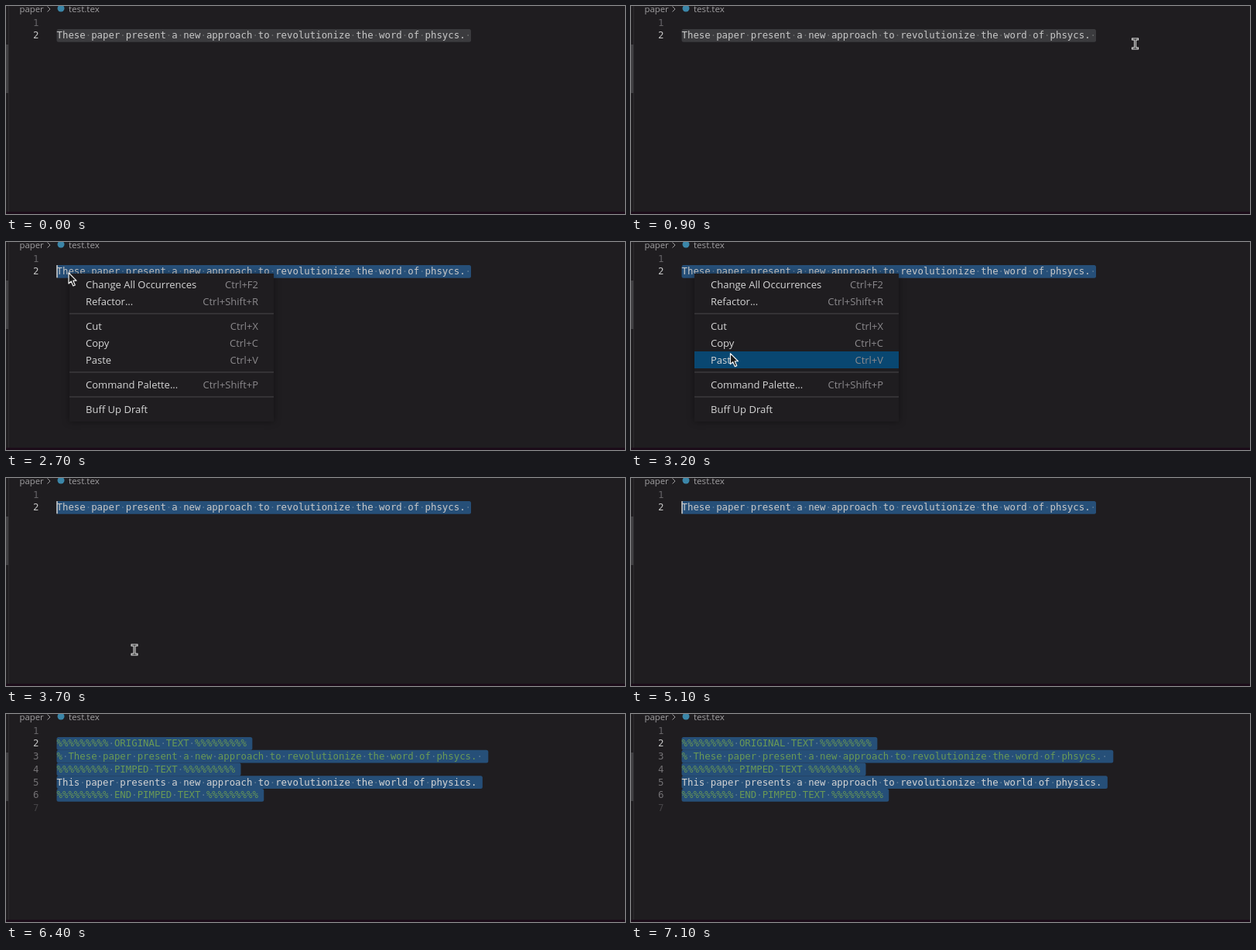
An HTML page with a canvas that plays this animation: 800x270 px, repeating every 7.2 s.

```html
<!DOCTYPE html>
<html lang="en">
<head>
<meta charset="utf-8">
<title>Editor rewrite</title>
<style>
html, body { margin: 0; width: 800px; height: 270px; overflow: hidden; background: #1f1d20; }
canvas { display: block; }
</style>
</head>
<body>
<canvas id="stage" width="800" height="270"></canvas>
<script>
const ctx = document.getElementById('stage').getContext('2d');
const LOOP = 7200, STEP = 100;
const LEFT = 65.5, TOP = 30, CHAR = 7.4375, LINE = 16.75;
const MONO = '12.35px "DejaVu Sans Mono", monospace';
const SANS = '"Open Sans", "Noto Sans", sans-serif';
const CLICK = 1200, DRAG_END = 2400, MENU = 2700, BLUR = 2900, CLOSE = 3700,
      HIDE = 4000, REPLACE = 5500, COLOUR = 6400;

const draft = 'These paper present a new approach to revolutionize the word of phsycs. ';
const bar = '%'.repeat(9);
const result = [
  `${bar} ORIGINAL TEXT ${bar}`,
  '% ' + draft,
  `${bar} PIMPED TEXT ${bar}`,
  'This paper presents a new approach to revolutionize the world of physics.',
  `${bar} END PIMPED TEXT ${bar}`
];

// label, shortcut, y
const items = [
  ['Change All Occurrences', 'Ctrl+F2', 55],
  ['Refactor...', 'Ctrl+Shift+R', 77],
  ['Cut', 'Ctrl+X', 109],
  ['Copy', 'Ctrl+C', 131],
  ['Paste', 'Ctrl+V', 153],
  ['Command Palette...', 'Ctrl+Shift+P', 185],
  ['Buff Up Draft', '', 217]
];

// time, x, y
const path = [
  [300, 686, 90], [800, 652, 49], [1300, 650, 49], [1400, 600, 56],
  [1800, 286, 61], [2000, 110, 54], [2100, 62, 42], [2300, 44, 40],
  [2500, 72, 39], [2600, 81, 40], [2800, 81, 40], [3500, 164, 223], [3700, 166, 223]
];

function mouseAt(t) {
  const i = path.findIndex(p => p[0] > t);
  if (i < 0) return path[path.length - 1].slice(1);
  if (i === 0) return path[0].slice(1);
  const [a, ax, ay] = path[i - 1], [b, bx, by] = path[i];
  const k = (t - a) / (b - a);
  return [ax + (bx - ax) * k, ay + (by - ay) * k];
}

function box(x, y, w, h, color) {
  ctx.fillStyle = color;
  ctx.fillRect(x, y, w, h);
}

function text(str, x, y, color, font, align = 'left') {
  ctx.font = font;
  ctx.textAlign = align;
  ctx.fillStyle = color;
  ctx.fillText(str, x, y);
}

const baseline = row => TOP + row * LINE + 12.4;

// Text on the fixed character grid; spaces from column `from` show as dots
function code(str, row, color, from) {
  [...str].forEach((c, i) => {
    const x = LEFT + i * CHAR;
    if (c !== ' ') text(c, x, baseline(row), color, MONO);
    else if (i >= from) text('·', x, baseline(row), 'rgba(227,228,226,.27)', MONO);
  });
}

function select(row, from, to, color) {
  ctx.fillStyle = color;
  ctx.beginPath();
  ctx.roundRect(LEFT + from * CHAR, TOP + row * LINE, (to - from) * CHAR, LINE, 2.5);
  ctx.fill();
}

function lineNumber(n, color) {
  text(n, 42.5, baseline(n - 2), color, MONO, 'right');
}

function frame() {
  box(0, 0, 800, 270, '#1f1d20');
  box(3, 0, 1, 267, '#2d2b2e');
  box(0, 50, 3, 63, '#414043');
  box(0, 267, 800, 3, '#1b0c19');
  text('paper', 17.5, 8, '#a09fa1', '11.3px ' + SANS);
  text('test.tex', 81, 8, '#a09fa1', '11.6px ' + SANS);
  ctx.strokeStyle = '#a09fa1';
  ctx.lineWidth = 1;
  ctx.stroke(new Path2D('M53.5 0.5l3.5 3.5l-3.5 3.5'));
  ctx.fillStyle = '#3b86a8';
  ctx.beginPath();
  ctx.arc(71, 3, 4.5, 0, 7);
  ctx.fill();
}

function editor(t, [mx, my]) {
  const done = t >= REPLACE;
  let start = 0;
  if (t >= CLICK && t < DRAG_END) {
    start = my > TOP + LINE ? draft.length
      : Math.max(0, Math.min(draft.length, Math.round((mx - LEFT) / CHAR)));
  }
  lineNumber(1, '#666467');
  lineNumber(2, '#c6c6c6');

  if (done) {
    for (let n = 3; n < 7; n++) lineNumber(n, '#737174');
    lineNumber(7, '#454346');
    result.forEach((s, row) => select(row, 0, s.length + 1, '#264f78'));
    result.forEach((s, row) => {
      const comment = s[0] === '%';
      code(s, row, t < COLOUR ? '#c3c8cd' : comment ? '#6a9955' : '#d4d4d4', 0);
    });
  } else {
    if (start === draft.length) {
      box(62, 30, 738, 1, '#29272a');
      box(62, 45.5, 738, 1, '#29272a');
    } else {
      select(0, start, draft.length, t < CLICK ? '#3b3b3e' : '#264f78');
    }
    code(draft, 0, '#c8c8c8', start);
  }

  const since = t - (done ? REPLACE : CLOSE);
  const caret = t < CLOSE ? t >= CLICK && t < BLUR : since % 1000 < 500;
  if (caret) box(LEFT + start * CHAR - .3, TOP, 1.6, 16.4, '#c9c9c8');
}

function menu([mx, my]) {
  ctx.save();
  ctx.shadowColor = 'rgba(0,0,0,.4)';
  ctx.shadowBlur = 9;
  box(82, 41, 264, 192, '#1f1d20');
  ctx.restore();
  for (const y of [93, 169, 201]) box(82, y - .5, 264, 1, '#4a484b');
  for (const [label, keys, y] of items) {
    if (mx > 82 && Math.abs(my - y) < 11) box(82, y - 11, 264, 22, '#094771');
    text(label, 103, y + 4.8, '#d6d6d6', '13px ' + SANS);
    text(keys, 326, y + 4.8, '#8b898c', '13px ' + SANS, 'right');
  }
}

const arrow = new Path2D('M0 0V14L3.2 11L5.8 17L8.3 16L5.8 10.2H10Z');
const beam = new Path2D('M-3 -6H3M0 -6V6M-3 6H3');

function pointer(isArrow, [x, y]) {
  ctx.save();
  ctx.translate(x, y);
  ctx.lineJoin = 'round';
  ctx.strokeStyle = '#f2f2f2';
  if (isArrow) {
    ctx.fillStyle = '#1a1a1a';
    ctx.fill(arrow);
    ctx.lineWidth = 1.2;
    ctx.stroke(arrow);
  } else {
    ctx.lineCap = 'square';
    ctx.lineWidth = 3;
    ctx.stroke(beam);
    ctx.strokeStyle = '#1a1a1a';
    ctx.lineWidth = 1;
    ctx.stroke(beam);
  }
  ctx.restore();
}

function draw(now) {
  const t = Math.floor(now % LOOP / STEP) * STEP;
  const mouse = mouseAt(t);
  frame();
  editor(t, mouse);
  if (t >= MENU && t < CLOSE) menu(mouse);
  if (t >= path[0][0] && t < HIDE) pointer(t >= 2500 && t < CLOSE, mouse);
  requestAnimationFrame(draw);
}
requestAnimationFrame(draw);
</script>
</body>
</html>
```
